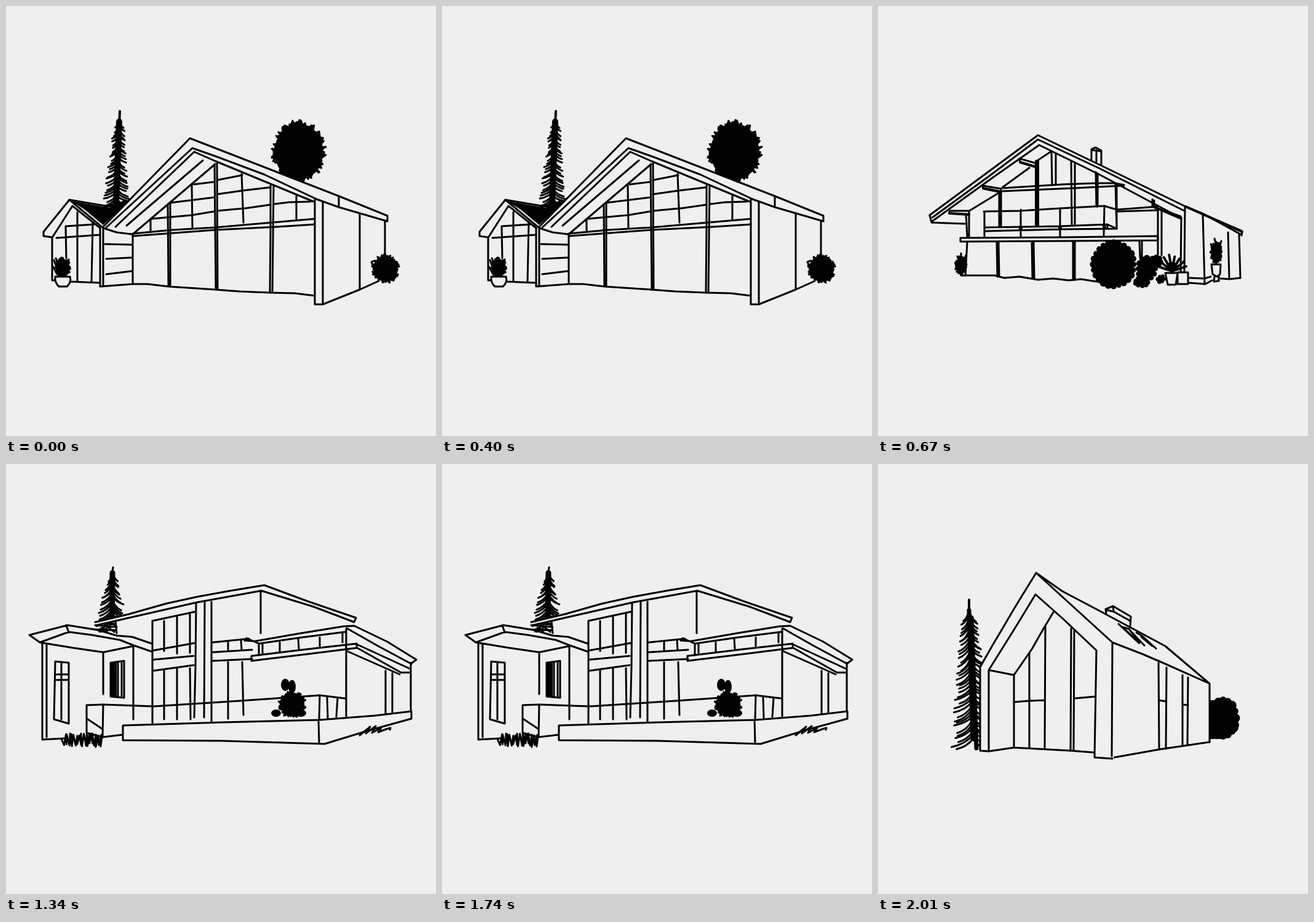
These frames come from a looping animation (699x699 px, 2680 ms). An HTML page with a canvas:

```html
<!DOCTYPE html>
<html lang="en">
<head>
<meta charset="utf-8">
<title>Four houses</title>
<style>
html, body { margin: 0; height: 100%; overflow: hidden; background: #efefef; }
canvas { display: block; width: 100vmin; height: 100vmin; }
</style>
</head>
<body>
<canvas id="stage" width="699" height="699"></canvas>
<script>
const HOLD = 670, PAPER = '#efefef';
const ctx = document.getElementById('stage').getContext('2d');
let seed = 1;
const rnd = () => (seed = seed * 16807 % 2147483647) / 2147483647;
const mix = (a, b, t) => a + (b - a) * t;

function ink(d, width = 3) {
  ctx.lineWidth = width;
  ctx.stroke(new Path2D(d));
}
function fill(d, color = '#000') {
  ctx.fillStyle = color;
  ctx.fill(new Path2D(d));
}
const paper = d => fill(d, PAPER);

function oval(x, y, rx, ry = rx) {
  ctx.fillStyle = '#000';
  ctx.beginPath();
  ctx.ellipse(x, y, rx, ry, 0, 0, 7);
  ctx.fill();
}

// Solid bush with a bumpy rim
function bush(x, y, rx, ry, bumps, size) {
  oval(x, y, rx, ry);
  for (let i = 0; i < bumps; i++) {
    const a = i / bumps * 2 * Math.PI;
    oval(x + rx * Math.cos(a), y + ry * Math.sin(a), size * (0.8 + 0.4 * rnd()));
  }
}

// Scribbled bush: short chords crossing the rim
function scrub(x, y, rx, ry, strokes) {
  oval(x, y, rx * 0.88, ry * 0.88);
  let d = '';
  for (let i = 0; i < strokes; i++) {
    const a = i * 2.4 + rnd(), r = 0.85 + 0.15 * rnd();
    d += (i ? 'L' : 'M') + (x + rx * r * Math.cos(a)) + ' ' + (y + ry * r * Math.sin(a));
  }
  ink(d);
}

// Drooping branches on both sides of a trunk, widening downwards
function fir(x0, y0, x1, y1, w0, w1, rows, drop, trunk) {
  ink(`M${x0} ${y0}L${x1} ${y1}`, trunk);
  for (let i = 0; i <= rows; i++) {
    const t = i / rows, x = mix(x0, x1, t), y = mix(y0, y1, t);
    for (const side of [-1, 1]) {
      const w = side * mix(w0, w1, t) * (0.72 + 0.34 * rnd()), h = drop * (0.8 + 0.4 * rnd());
      ink(`M${x} ${y}Q${x + w * 0.35} ${y + h * 0.75} ${x + w} ${y + h}`);
    }
  }
}

// Leaves spreading upwards from a pot
function leaves(x, y, length, count, spread) {
  for (let i = 0; i < count; i++) {
    const a = mix(-spread, spread, i / (count - 1)), r = length * (0.85 + 0.2 * rnd());
    ink(`M${x} ${y}L${x + r * Math.sin(a)} ${y - r * Math.cos(a)}`, 4);
  }
}

function glassGable() {
  ink('M185 171L184 195', 4);
  fir(184, 188, 179, 318, 9, 21, 25, 11, 10);
  scrub(476, 237, 45, 52, 90);
  ink('M450 197L470 198M509 207L511 226', 4);
  paper('M299 215L541 309L620 341V350L616 405 606 447 515 485H502V471L340 461 206 452 153 456 157 360Z');
  paper('M61 367L103 315 157 359 153 450 75 446V376Z');
  fill('M106 317L168 328 195 314 196 320 158 356 128 331Z');
  ink('M103 315L168 326 196 319M128 326L176 335');
  // Roofs
  ink('M75 376L61 374V367L103 315 157 360M76 375L108 325 153 361M157 360L299 215 541 309 620 341V350L541 327 502 313');
  ink('M541 309V327M163 360L303 231 340 244 420 274 505 314M178 359L306 237 340 252 500 318M320 251L196 357M340 257L206 371M158 361L180 368 205 371');
  // Walls
  ink('M75 377V446H82M104 448L153 450M153 362V456L206 452M158 362V456M206 371V452L230 452 264 456 340 461 380 464 430 466 470 467 502 471');
  ink('M502 315V485H515V318M515 485L575 461 606 447M575 337V461M616 350V405M161 387L205 388M163 411L204 409M163 436L204 431');
  // Glazing
  ink('M97 359L98 410M116 335V448M141 352L139 449M97 358L143 355M82 377L152 372M206 370L270 364 340 360 420 353 502 346M206 374L340 364 440 359 502 355');
  ink('M263 322L264 455M267 320V455M339 257L341 461M343 256L344 461M430 292V360L429 466M435 293L433 466M235 346V367M302 291L303 360M383 273L386 352M472 309V346');
  ink('M236 346L302 340 338 334M343 333L386 329M388 329L430 323M436 322L460 319 495 318M266 320L339 311M343 306L385 300 428 295M305 290L338 286M343 283L384 275');
  // Plants
  scrub(617, 427, 23, 24, 50);
  ink('M600 414L594 416 596 421');
  scrub(92, 425, 13, 16, 34);
  ink('M78 413L84 430M76 423L83 436M81 410L88 426M90 409L92 420M102 412L100 432');
  paper('M80 440H104Q107 449 99 456H86Q79 450 80 440Z');
  ink('M80 440H104Q107 449 99 456H86Q79 450 80 440Z');
}

function chalet() {
  // Roof and chimney
  ink('M84 340L180 269 260 210 360 258 500 326 592 366 591 373M88 344L180 277 260 217 360 264 498 333M88 350L185 280 262 226 360 274 493 345');
  ink('M84 340L87 352 141 354M500 326L529 338 591 372M347 250V233L354 230 363 235V257M355 234V253M347 234L361 236');
  ink('M500 326L592 367', 4);
  // Purlins
  ink('M116 333H148V339L116 337ZM170 292L200 297V303L171 297ZM230 248L258 256V262L231 254Z');
  ink('M116 337L148 339M171 296L200 302M231 254L258 262', 4);
  ink('M150 332L196 304M202 295L246 263M258 252L282 236');
  // Posts and beams
  ink('M143 338L145 375M148 338V375M197 302V358M200 302V358M282 239L283 291M289 241V291M314 253L315 355M320 256V355M354 270L355 326M357 272V326M386 288L388 362M388 289V362');
  ink('M257 252V357M260 252V357', 4);
  ink('M203 296L300 290 354 288 385 288 400 291M203 301L320 296 400 292M283 291L300 290M172 334L230 333 295 329 368 325 388 331 455 326M390 334L455 332');
  // Balcony
  ink('M173 334V377M173 360L295 358 373 355 388 362M173 366L295 363 388 362M232 331V376M296 329V375M368 325L367 374M373 355V361M134 377L300 376 455 374V381L300 382 134 383Z');
  oval(232, 362, 3); oval(296, 360, 3); oval(368, 359, 3);
  // Right wing
  ink('M455 329V405M461 331V405M446 314V326L493 346M449 316V327L492 342M493 344L492 433M499 326L498 433M528 338L531 452M569 368L571 444M587 372L589 442');
  // Ground floor
  ink('M145 384L142 438M193 384L194 440M196 384L197 440M250 383L251 443M253 383L254 443M317 383V445M320 383V445M425 383L426 410M429 383V410');
  ink('M135 438L190 438 205 442 230 440 260 445 285 443 310 446 330 444 355 448M486 451L505 450 532 452 543 446M506 442L530 443 541 440M557 443L571 444 589 442');
  // Plants
  bush(383, 420, 33, 35, 24, 5);
  bush(437, 427, 14, 17, 12, 5);
  bush(452, 416, 8, 8, 8, 4);
  bush(428, 449, 10, 6, 9, 4);
  bush(460, 444, 5, 5, 6, 3);
  scrub(135, 422, 10, 16, 28);
  ink('M135 402V416M129 407L133 418M143 405L138 420');
  leaves(478, 431, 27, 8, 1.25);
  oval(478, 424, 9, 8);
  scrub(550, 401, 10, 18, 26);
  ink('M547 378L551 394M541 387L548 402M558 382L553 402M550 404V420');
  const pots = 'M467 434H487L484 453H471ZM487 433H504V452H487ZM542 420H557L556 436 551 440 544 436Z';
  paper(pots);
  ink(pots + 'M547 440L546 448 554 447V439');
}

function villa() {
  ink('M174 168L172 182', 3);
  fir(173, 177, 172, 258, 9, 28, 15, 15, 9);
  paper('M145 258L310 216 420 197 569 250 566 262 667 318 659 414 518 455 59 448V292L38 278 100 262 180 280 180 258Z');
  ink('M145 262L180 265M146 269L178 270M152 262L164 272M160 260L176 273');
  // Left wing
  ink('M38 278L100 262 150 270 180 279 205 281 237 292M38 278L55 290 102 273 140 278 185 286 208 295 237 305M98 262L102 274M55 290L110 299 158 306 207 296');
  ink('M59 292V448L95 446M66 293V444M158 306V374M207 297V415M80 321L102 323V422L78 415ZM90 323V415M82 342H102M82 351H102');
  ink('M170 323L192 320V380L170 378ZM173 325V376M182 322V378M188 322V378');
  ink('M177 325V376', 6);
  // Main roof
  ink('M145 257L200 244 260 227 310 216 365 206 420 197 490 223 569 250 566 257M148 262L200 250 310 225 415 206 500 232 566 257M414 206V275M178 256L180 275');
  // Tower and windows
  ink('M309 226L308 330 306 412M323 225L322 412M334 224V420M238 255L308 240M238 255V421M257 255V304M257 334V415M278 249V308M278 332V415M299 243V307M299 332L300 415');
  ink('M240 303L307 291M240 318L305 312M240 336L305 327M336 290L395 284M336 306L400 302M336 320L400 317M361 288V302M382 286L383 302M361 322V414M384 322L386 408');
  // Right wing
  ink('M388 287L405 288 480 275 548 264 566 263 620 289 667 318 659 324M391 283L411 292 480 282 551 273M411 292V311M417 293V307M399 312L490 301 570 292V299L490 309 399 320Z');
  ink('M445 290V305M475 284L476 300M510 282V296M547 274V290M553 268V410M554 267L605 296 659 325M570 293L657 333M571 299L642 339H657M554 304L640 342M617 336V405M628 340V404M658 323V402');
  // Terrace
  ink('M131 437V392L158 391 240 394 380 385 510 376 551 381M158 391L157 444M133 415L157 431M131 437L157 444 190 440M190 425L350 420 510 416 600 409 659 402V414L590 433 518 455 350 450 190 449ZM508 416L509 453');
  ink('M510 376L509 415M522 379L523 413M539 380L537 411');
  // Plants
  oval(454, 359, 7, 10); oval(465, 362, 6, 11);
  scrub(465, 391, 23, 22, 38);
  oval(439, 405, 8, 6); oval(479, 405, 9, 6);
  let grass = 'M90 447';
  for (let i = 0; i < 34; i++) grass += `L${92 + i * 1.9 + 4 * rnd()} ${i % 2 ? 442 - 4 * rnd() : 454 + 6 * rnd()}`;
  ink(grass);
  ink('M575 441L592 427 585 438 601 426 595 437 610 429 605 436 618 431 625 429 624 432');
}

function barn() {
  ink('M148 221V248', 4);
  fir(148, 238, 154, 447, 13, 33, 35, 17, 7);
  ink('M152 250L160 462', 7);
  bush(561, 413, 20, 29, 16, 7);
  oval(577, 428, 9);
  fill('M539 384H560V447H539Z');
  paper('M166 466L167 325 257 177 300 207 467 296 539 357V452L381 479 352 477 180 468Z');
  // Frame and roof
  ink('M180 467L166 466V330L186 295 225 229 257 177 381 290 380 475M257 177L300 207 355 236 467 296 539 357V452M381 290L430 309 465 324 539 357');
  ink('M180 335L225 263 256 212 300 251 355 303 352 477 381 479M180 335V467L221 461 313 466 352 469M180 335L221 343V461M221 343L250 301 270 266 285 241');
  // Glazing
  ink('M246 308V462M272 264L271 462M314 267L313 466M319 271L318 466M221 387L245 385 271 384M320 381L353 378');
  ink('M384 477L457 464 539 452M456 323L457 464M469 331L468 463M495 343V458M504 347L503 457M457 384L468 386M495 391L504 392');
  // Chimney and skylights
  paper('M370 236L382 231 411 248 410 263 371 243Z');
  ink('M371 243L370 236 382 231 411 248 410 263M370 237L383 240 410 255M382 231L383 240');
  ink('M391 260L424 291M397 265L408 268 425 291M403 270L421 288M413 274L433 295M420 274L430 280 452 300M428 281L446 296');
}

ctx.lineCap = ctx.lineJoin = 'round';
const houses = [glassGable, chalet, villa, barn];
let shown = -1;

function tick() {
  const now = Math.floor(performance.now() / HOLD) % houses.length;
  if (now !== shown) {
    shown = now;
    seed = 77 + now;
    ctx.fillStyle = PAPER;
    ctx.fillRect(0, 0, 699, 699);
    ctx.strokeStyle = '#000';
    houses[now]();
  }
  requestAnimationFrame(tick);
}
tick();
</script>
</body>
</html>
```
